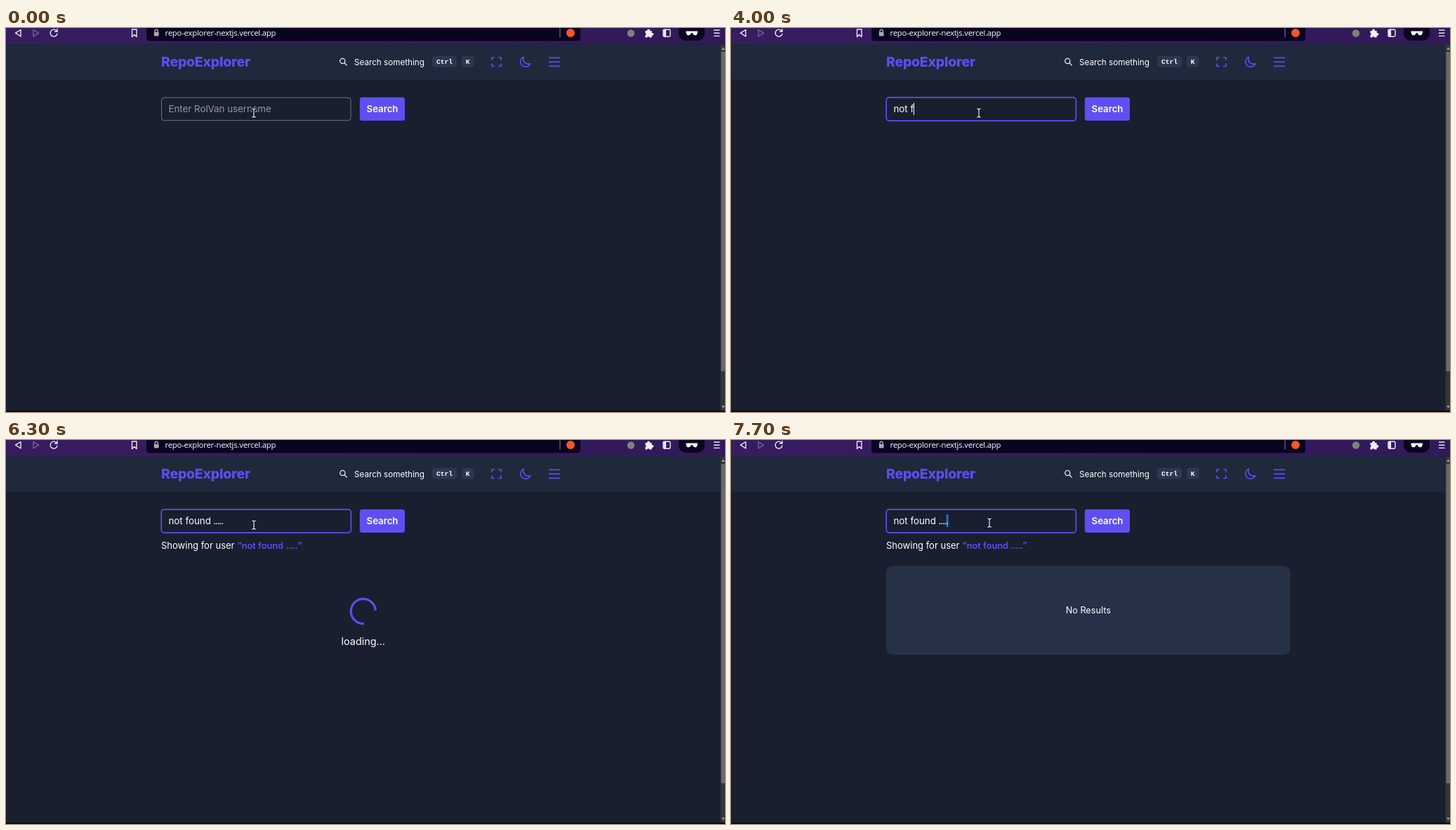
Animation, 1024 px wide and 547 px high, one loop 8 s. Source, as an HTML page:

```html
<!DOCTYPE html>
<html lang="en">
<head>
<meta charset="utf-8">
<title>Repository search</title>
<style>
  html, body { margin: 0; width: 100%; height: 100%; overflow: hidden; background: #191f2e; }
  svg { display: block; width: 1024px; height: 547px; }
  text { font-family: Inter, "Open Sans", sans-serif; white-space: pre; fill: #fff; }
  .line { fill: none; stroke: #eceaf2; stroke-width: 1.4; stroke-linecap: round; stroke-linejoin: round; }
  .accent { fill: none; stroke: #5d4df0; stroke-width: 1.7; stroke-linejoin: round; }
  .url { font: 11.3px "Open Sans", "Noto Sans", sans-serif; letter-spacing: -.2px; }
  .brand { font-size: 19.4px; font-weight: 800; letter-spacing: -.2px; fill: #5d4df0; }
  .key { font: bold 9.6px "Liberation Mono", monospace; }
  .field { font-size: 13.3px; }
  .dots { letter-spacing: -1.15px; }
  .user { font-size: 12.8px; font-weight: 600; fill: #5d4df0; }
  .user .dots { letter-spacing: -.7px; }
  .mid { text-anchor: middle; }
</style>
</head>
<body>
<svg viewBox="0 0 1024 547">
  <defs>
    <linearGradient id="bar">
      <stop offset="0" stop-color="#371c60"/>
      <stop offset="1" stop-color="#321959"/>
    </linearGradient>
    <path id="stem" d="M-2.5-6Q0-6 0-4.5Q0-6 2.5-6M0-4.5V4.5M-2.5 6Q0 6 0 4.5Q0 6 2.5 6"/>
  </defs>

  <!-- browser bar -->
  <rect width="1024" height="23.5" fill="url(#bar)"/>
  <path d="M200 0H818V14Q818 18.6 813.5 18.6H204.5Q200 18.6 200 14Z" fill="#0a0420"/>
  <g class="line">
    <path d="M21 2.5V12L13.5 7.2Z"/>
    <path d="M39 2.5V12L46.5 7.2Z" style="stroke:#75668f"/>
    <path d="M72.2 4.2A5 5 0 1 0 73 8.2M73 1.5V5H69.5"/>
    <path d="M179.5 2H186V12.5L182.7 9.6 179.5 12.5Z"/>
    <path d="M212 6V4.5a2.2 2.2 0 0 1 4.4 0V6" style="stroke:#aaa6b4"/>
    <path d="M789 1V13" style="stroke:#8a8496;stroke-width:1"/>
    <rect x="936" y="2.2" width="10" height="10" rx="1.6"/>
    <path d="M1008.5 3H1016M1008.5 7.2H1016M1008.5 11.4H1016"/>
  </g>
  <rect x="210.8" y="5.8" width="6.8" height="5.6" rx="1" fill="#aaa6b4"/>
  <rect x="936.5" y="2.5" width="3.6" height="9.4" fill="#eceaf2"/>
  <text class="url" x="226.5" y="11">repo-explorer-nextjs.vercel.app</text>
  <circle cx="804" cy="7" r="6" fill="#f4552b"/>
  <circle cx="890" cy="7.5" r="5.2" fill="#7e8377"/>
  <path d="M910.5 4h2.7a2 2 0 1 1 3.8 0h2.7v3a2 2 0 1 1 0 3.8v2.7h-3.2a1.8 1.8 0 0 0-3.4 0h-2.6v-3.2a1.8 1.8 0 0 0 0-3.4Z" fill="#f1eff5"/>
  <rect x="958" y="-8" width="37" height="26" rx="10" fill="#0c0521"/>
  <path d="M968.5 4.5H985V6.5L983.5 10Q980 11.5 978 8L977.2 6.8H976.3L975.5 8Q973.5 11.5 970 10L968.5 6.5Z" fill="#fff"/>

  <!-- page header -->
  <rect y="23.5" width="1018" height="50" fill="#1e293b"/>
  <text class="brand" x="221" y="55">RepoExplorer</text>
  <g class="line" style="stroke-width:1.3">
    <circle cx="479.3" cy="47" r="3.6"/>
    <path d="M482 49.8L485.2 53"/>
  </g>
  <text x="496" y="52.5" font-size="11.7">Search something</text>
  <rect x="607" y="40" width="35" height="15.5" rx="4" fill="#2c3851"/>
  <rect x="649" y="40" width="17.5" height="15.5" rx="4" fill="#2c3851"/>
  <text class="key mid" x="624.5" y="51">Ctrl</text>
  <text class="key mid" x="657.7" y="51">K</text>
  <g class="accent">
    <path d="M692 46V42H696M701 42H705V46M705 50.5V54.5H701M696 54.5H692V50.5"/>
    <path d="M746.7 50.7A7.2 7.2 0 0 1 737.3 41.3A7.2 7.2 0 0 0 740 55.2A7.2 7.2 0 0 0 746.7 50.7Z"/>
    <path d="M773 42.3H789M773 48.3H789M773 54.3H789"/>
  </g>

  <!-- search form -->
  <rect id="box" fill="none" rx="4"/>
  <rect id="mark" x="306.7" y="106" width="2.8" height="18" fill="#1b76d6"/>
  <text id="hint" class="field" x="231.5" y="119.7" style="fill:#9299a6">Enter RolVan username</text>
  <text id="typed" class="field" x="231.5" y="119.7"><tspan></tspan><tspan class="dots"></tspan></text>
  <rect id="caret" y="106.5" width="1" height="17.5" fill="#fff"/>
  <rect x="503.8" y="98.8" width="64.2" height="33.2" rx="3.5" fill="#5f4ff0"/>
  <text class="mid" x="536" y="119.7" font-size="13.2" font-weight="600">Search</text>

  <!-- results -->
  <text id="heading" x="221" y="155" font-size="13">Showing for user <tspan class="user">“not found <tspan class="dots">.....</tspan>”</tspan></text>
  <g id="loading">
    <circle id="ring" cx="508.8" cy="244" r="17.6" fill="none" stroke="#5d4df0" stroke-width="3.2" pathLength="100" stroke-dasharray="75 25"/>
    <text class="mid" x="508.8" y="291.5" font-size="14.4">loading...</text>
  </g>
  <g id="empty">
    <rect x="221" y="179.5" width="575.5" height="126.5" rx="9" fill="#263148"/>
    <text class="mid" x="508.8" y="246.8" font-size="12.7">No Results</text>
  </g>

  <!-- scrollbar and window edge -->
  <rect x="1017.5" y="23.5" width="6.5" height="523.5" fill="#343536"/>
  <rect x="1018.5" y="34" width="5.5" height="455" fill="#6b6b6c"/>
  <path d="M1019 31L1021.5 27.5 1024 31ZM1019 538L1021.5 541.5 1024 538Z" fill="#a0a0a0"/>
  <rect y="545" width="1024" height="2" fill="#090b12"/>

  <!-- pointers, placed by their hot spot -->
  <g id="beam" fill="none" stroke-linecap="square">
    <use href="#stem" stroke="#0b0d13" stroke-width="3"/>
    <use href="#stem" stroke="#fff" stroke-width="1.2"/>
  </g>
  <path id="arrow" d="M0 0V13L3 10.3 5 15 7.2 14 5.2 9.5H9.3Z" fill="#0b0d13" stroke="#fff"/>
</svg>
<script>
const LOOP = 8000, STEP = 100;
const $ = id => document.getElementById(id);

// [time, text in the field]
const typing = [
  [0, ""], [1700, "no"], [2200, "nout"], [2600, "nou"], [2800, "no"], [2900, "not"],
  [3100, "not "], [4000, "not f"], [4100, "not fo"], [4200, "not fou"],
  [4400, "not found"], [4600, "not found "], [4800, "not found ."], [4900, "not found .."],
  [5100, "not found ..."], [5200, "not found ...."], [5300, "not found ....."]
];
// [time, caret visible]
const blink = [
  [0, false], [500, true], [1000, false], [1700, true], [3600, false],
  [4000, true], [5800, false], [7400, true], [7700, false]
];
// [time, x, y]
const pointer = [
  [0, 353, 121], [6600, 372, 132], [6700, 424, 160], [6800, 467, 186],
  [7000, 460, 176], [7100, 430, 150], [7200, 398, 130], [7300, 376, 121], [7400, 368, 118]
];

const at = (table, t) => table.findLast(row => row[0] <= t);
const show = (id, on) => $(id).setAttribute("visibility", on ? "visible" : "hidden");
const set = (id, attrs) => {
  for (const key in attrs) $(id).setAttribute(key, attrs[key]);
};

function drawField(t) {
  const focused = t >= 500;
  set("box", focused
    ? { x: 221.2, y: 98.9, width: 270.2, height: 33.2, stroke: "#5d4df0", "stroke-width": 1.7 }
    : { x: 221.5, y: 99.2, width: 269.5, height: 32.5, stroke: "#6b7484", "stroke-width": 1 });

  const text = at(typing, t)[1];
  const words = text.replace(/\.+$/, "");
  const [main, dots] = $("typed").children;
  main.textContent = words;
  dots.textContent = text.slice(words.length);
  show("hint", !text);

  const width = text ? $("typed").getComputedTextLength() : 0;
  set("caret", { x: Math.round(231.5 + width) });
  show("caret", at(blink, t)[1]);
  show("mark", t >= 7700);
}

function drawResults(t) {
  show("heading", t >= 5600);
  show("loading", t >= 5600 && t < 6500);
  show("empty", t >= 6500);
  const angle = 86 + (t - 6300) * 0.36;
  set("ring", { transform: `rotate(${angle} 508.8 244)` });
}

function drawPointer(t) {
  const [, x, y] = at(pointer, t);
  const inField = y < 133;
  show("beam", inField);
  show("arrow", !inField);
  set(inField ? "beam" : "arrow", { transform: `translate(${x} ${y})` });
}

function draw() {
  const t = Math.floor(performance.now() % LOOP / STEP) * STEP;
  drawField(t);
  drawResults(t);
  drawPointer(t);
  requestAnimationFrame(draw);
}
draw();
</script>
</body>
</html>
```
